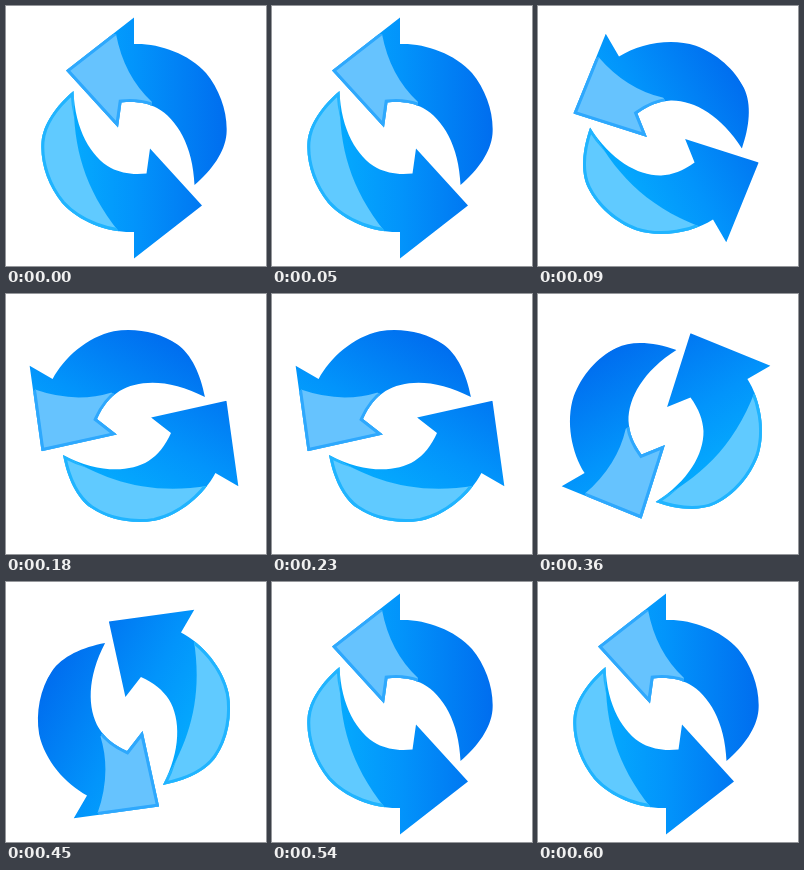
Write an HTML page that moves like this. It is 260 by 260 pixels and loops after 640 ms.

```html
<!DOCTYPE html>
<html lang="en">
<head>
<meta charset="utf-8">
<title>Refresh arrows</title>
<style>
  html, body { margin: 0; width: 100%; height: 100%; overflow: hidden; background: #fff; }
  svg { display: block; width: 260px; height: 260px; }
</style>
</head>
<body>
<svg viewBox="0 0 260 260">
  <defs>
    <path id="arrow" d="M0-120.5-68-67.5-16-10.5-12.5-35.5C2-37 13-35 23-30
      C43-19 59 8 60.5 47C78 32 91 14 92.5-4C94-25 86-48 72-65C54-85 24-95 0-94Z"/>
    <linearGradient id="body" gradientUnits="userSpaceOnUse" x1="-92" y1="0" x2="92" y2="0">
      <stop offset="0" stop-color="#06b4ff"/>
      <stop offset=".5" stop-color="#0294fb"/>
      <stop offset="1" stop-color="#006eef"/>
    </linearGradient>
    <clipPath id="upper"><use href="#arrow"/></clipPath>
    <clipPath id="lower"><use href="#arrow" transform="rotate(180)"/></clipPath>
    <clipPath id="upperGloss"><path d="M-18-104Q-10-62 18-36V0H-90V-104Z"/></clipPath>
    <clipPath id="lowerGloss"><path d="M-60-50C-62 0-54 46-14 95H-110V-50Z"/></clipPath>
  </defs>
  <g id="spin">
    <g fill="url(#body)">
      <!-- two rects, so both arrows share one gradient direction -->
      <rect x="-125" y="-125" width="250" height="250" clip-path="url(#upper)"/>
      <rect x="-125" y="-125" width="250" height="250" clip-path="url(#lower)"/>
    </g>
    <g stroke-width="6">
      <g clip-path="url(#upper)"><g clip-path="url(#upperGloss)">
        <use href="#arrow" fill="#66c3fe" stroke="#2ea8fd"/>
      </g></g>
      <g clip-path="url(#lower)"><g clip-path="url(#lowerGloss)">
        <use href="#arrow" transform="rotate(180)" fill="#60caff" stroke="#20b4ff"/>
      </g></g>
    </g>
  </g>
</svg>
<script>
  const LOOP = 640, STEP = 90, TURNS = 6;
  const spin = document.getElementById('spin');

  function draw(now) {
    // six 30° steps; the last pose repeats the first
    const step = Math.min(Math.floor(now % LOOP / STEP), TURNS) % TURNS;
    spin.setAttribute('transform', `translate(128 132) rotate(${-30 * step})`);
    requestAnimationFrame(draw);
  }
  draw(0);
</script>
</body>
</html>
```
